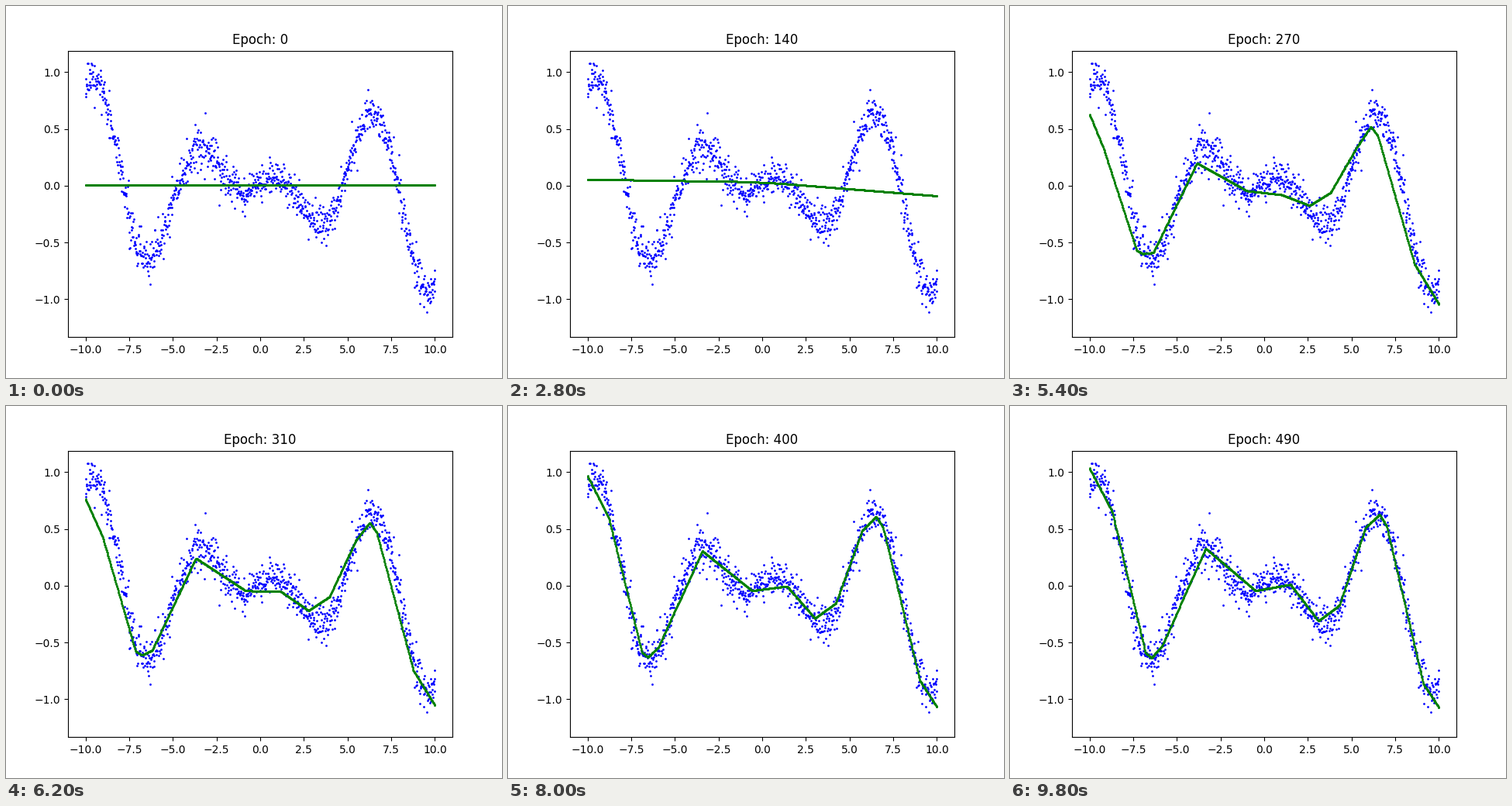
Write a matplotlib script that moves like this. It is 640 px wide and 480 px high and loops after 10 s.

```python
import numpy as np
import matplotlib.pyplot as plt
from matplotlib.animation import FuncAnimation

FRAMES, STEP_MS, EPOCHS_PER_FRAME = 50, 200, 10


def wave(x):
    return 0.1 * x * np.cos(x)


# Noisy samples of the wave, with a few wider strays
rng = np.random.default_rng(4)
x = np.linspace(-10, 10, 1000)
y = wave(x) + 0.075 * rng.standard_t(7, x.size).clip(-4.5, 4.5)
y = y.clip(-1.2177, 1.077)

# Kinks of the fitted line; the inner ones drift right while it settles
knots = np.array([-10, -9.2, -7.3, -6.95, -6.35, -3.85, -1, 1,
                  2.6, 3.8, 5.3, 6.1, 6.5, 8.6, 10])
drift = np.where(abs(knots) < 10, 0.5, 0)

flat = np.full(knots.size, 0.005)
bent = 0.033 - np.where(knots < 0, 0.0023, 0.0123) * knots
rough = np.array([.37, .18, -.26, -.29, -.275, -.14, -.01, -.01,
                  .04, .145, .265, .15, .04, -.7, -.985])
close = np.array([.63, .33, -.57, -.6, -.59, .2, -.045, -.08,
                  -.175, -.06, .34, .52, .44, -.69, -1.045])
final = wave(knots + drift)
final[0], final[-1] = 1.035, -1.075


def grow(power):
    return lambda u: u ** power


def settle(u):
    return 1 - (1 - u) ** 2


# (first frame, last frame, pose before, pose after, easing)
phases = [
    (0, 14, flat, bent, grow(9)),
    (14, 21, bent, rough, grow(1.7)),
    (21, 27, rough, close, grow(1)),
    (27, 49, close, final, settle),
]


def fit(frame):
    for first, last, before, after, ease in phases:
        if frame <= last:
            break
    t = ease((frame - first) / (last - first))
    shift = drift * t if after is final else 0
    return np.interp(x, knots + shift, before + (after - before) * t)


fig, ax = plt.subplots(figsize=(6.4, 4.8), dpi=100)
ax.plot(x, y, "b.", markersize=2)
curve, = ax.plot(x, fit(0), ".", color="green", markersize=2)
title = ax.set_title("Epoch: 0")
ax.set_xlim(-11, 11)
ax.set_ylim(-1.3343, 1.1898)


def draw(frame):
    curve.set_ydata(fit(frame))
    title.set_text(f"Epoch: {frame * EPOCHS_PER_FRAME}")
    return curve, title


anim = FuncAnimation(fig, draw, frames=FRAMES, interval=STEP_MS,
                     repeat=True, repeat_delay=0)
plt.show()
```
